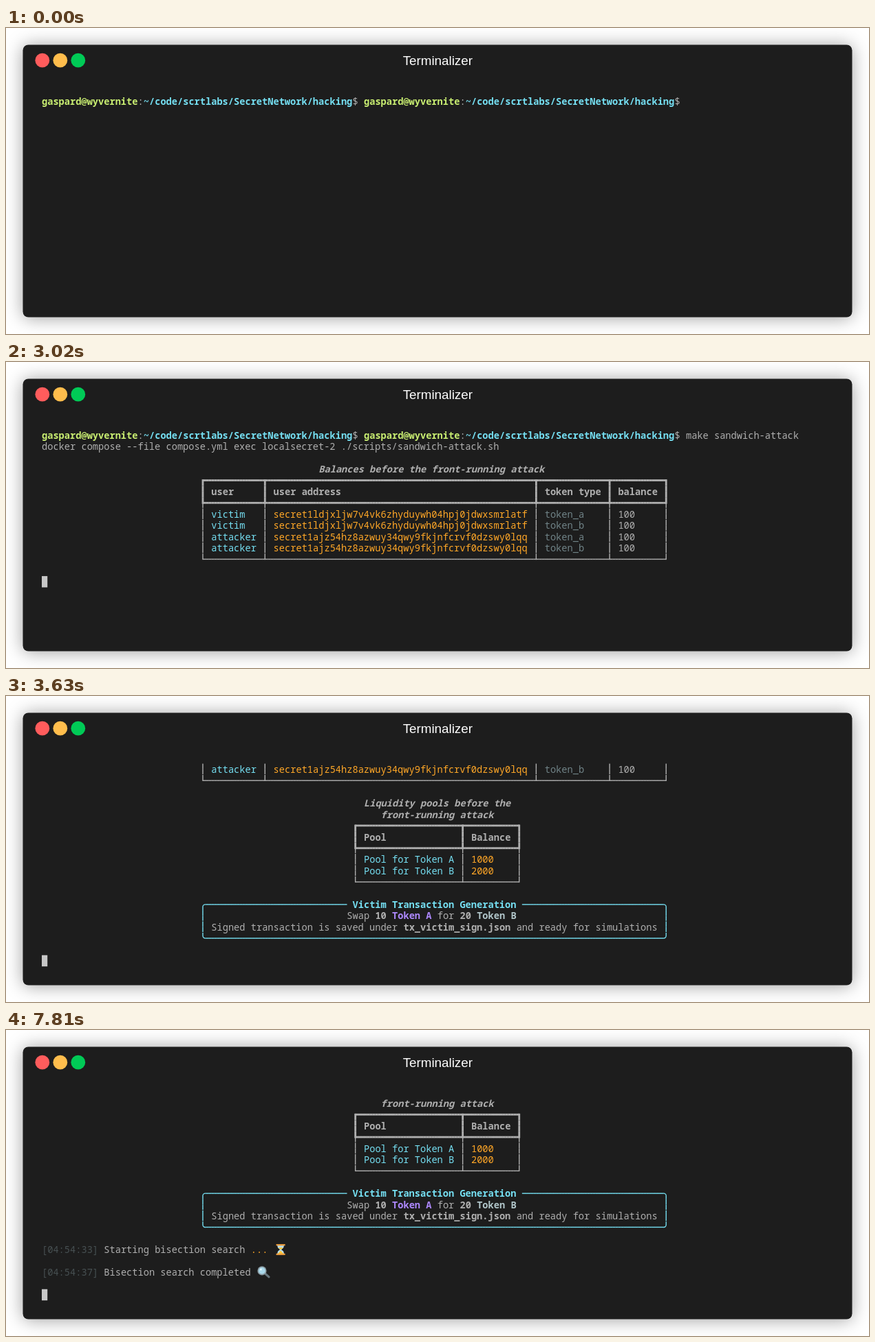
An HTML page with a canvas for the animation above (8 s loop, 1254x446 px).

```html
<!DOCTYPE html>
<html lang="en">
<head>
<meta charset="utf-8">
<title>Terminal session</title>
<style>
  html, body { margin: 0; width: 100%; height: 100%; overflow: hidden; background: #fff; }
  canvas { display: block; }
</style>
</head>
<body>
<canvas id="stage" width="1254" height="446"></canvas>
<script>
const ctx = document.getElementById('stage').getContext('2d');

const LOOP = 8000, CELL = 8.21, ROW = 16.42, LEFT = 52, TOP = 98.6, LAST_ROW = 17;
const FG = '#afafaf', GREEN = '#c8ed71', BLUE = '#75dff2', ORANGE = '#ffa727',
      TEAL = '#708387', PALE = '#b1c6ca', PURPLE = '#ae89fe', DIM = '#475052', CURSOR = '#c7c7c7';
const BOLD = 'bold', TITLE = 'italic bold';
const COMMAND = 'make sandwich-attack ', COMMAND_COL = 114;

// Arm weights of box characters: left, right, up, down
const ARMS = {
  '━': '2200', '─': '1100', '┃': '0022', '│': '0011', '┏': '0202', '┳': '2202', '┓': '2002',
  '┡': '0221', '╇': '2221', '┩': '2021', '└': '0110', '┴': '1110', '┘': '1010',
};
// Rounded corners: horizontal and vertical direction
const CORNERS = { '╭': [1, 1], '╮': [-1, 1], '╰': [1, -1], '╯': [-1, -1] };

// A line is a list of runs: [column, text, colour, style]
const prompt = col => [
  [col, 'gaspard@wyvernite', GREEN, BOLD],
  [col + 17, ':'],
  [col + 18, '~/code/scrtlabs/SecretNetwork/hacking', BLUE, BOLD],
  [col + 55, '$'],
];

function table(col, widths, header, rows, colours) {
  const rule = (l, fill, mid, r) => [[col, l + widths.map(w => fill.repeat(w)).join(mid) + r]];
  const body = (bar, cells, style) => {
    let x = col;
    const runs = [[x, bar]];
    widths.forEach((w, i) => {
      runs.push([x + 2, cells[i], style ? FG : colours[i], style], [x += w + 1, bar]);
    });
    return runs;
  };
  return [
    rule('┏', '━', '┳', '┓'),
    body('┃', header, BOLD),
    rule('┡', '━', '╇', '┩'),
    ...rows.map(cells => body('│', cells)),
    rule('└', '─', '┴', '┘'),
  ];
}

const VICTIM = 'secret1ldjxljw7v4vk6zhyduywh04hpj0jdwxsmrlatf';
const ATTACKER = 'secret1ajz54hz8azwuy34qwy9fkjnfcrvf0dzswy0lqq';

const lines = [
  [...prompt(0), ...prompt(57)],
  [[0, 'docker compose --file compose.yml exec localsecret-2 ./scripts/sandwich-attack.sh']],
  [],
  [[49, 'Balances before the front-running attack', FG, TITLE]],
  ...table(28, [10, 47, 12, 9], ['user', 'user address', 'token type', 'balance'], [
    ['victim', VICTIM, 'token_a', '100'],
    ['victim', VICTIM, 'token_b', '100'],
    ['attacker', ATTACKER, 'token_a', '100'],
    ['attacker', ATTACKER, 'token_b', '100'],
  ], [BLUE, ORANGE, TEAL, FG]),
  [],
  [[57, 'Liquidity pools before the', FG, TITLE]],
  [[60, 'front-running attack', FG, TITLE]],
  ...table(55, [18, 9], ['Pool', 'Balance'], [
    ['Pool for Token A', '1000'],
    ['Pool for Token B', '2000'],
  ], [BLUE, ORANGE]),
  [],
  [[28, '╭' + '─'.repeat(25), BLUE], [55, 'Victim Transaction Generation', BLUE, BOLD],
   [85, '─'.repeat(25) + '╮', BLUE]],
  [[28, '│', BLUE], [54, 'Swap'], [59, '10', FG, BOLD], [62, 'Token A', PURPLE, BOLD], [70, 'for'],
   [74, '20', FG, BOLD], [77, 'Token B', PALE, BOLD], [110, '│', BLUE]],
  [[28, '│', BLUE], [30, 'Signed transaction is saved under'], [64, 'tx_victim_sign.json', FG, BOLD],
   [84, 'and ready for simulations'], [110, '│', BLUE]],
  [[28, '╰' + '─'.repeat(81) + '╯', BLUE]],
  [],
  [[0, '[04:54:33]', DIM], [11, 'Starting bisection search'], [37, '...', ORANGE], [41, hourglass]],
  [],
  [[0, '[04:54:37]', DIM], [11, 'Bisection search completed'], [38, magnifier]],
  [],
];

// [time, cursor line, typed characters]; every line above the cursor is printed
const steps = [
  [0, 0, 0], [500, 0, 1], [610, 0, 2], [750, 0, 3], [860, 0, 4], [960, 0, 5], [1070, 0, 6],
  [1240, 0, 7], [1320, 0, 8], [1480, 0, 21], [2040, 1, 21], [2140, 2, 21], [2590, 3, 21],
  [3000, 12, 21], [3020, 13, 21], [3290, 21, 21], [3460, 22, 21], [3610, 26, 21],
  [3630, 27, 21], [3790, 28, 21], [3810, 29, 21], [5810, 30, 21], [7810, 31, 21],
];

function polygon(colour, ...points) {
  ctx.fillStyle = colour;
  ctx.beginPath();
  points.forEach(([x, y]) => ctx.lineTo(x, y));
  ctx.fill();
}

function circle(x, y, r, colour) {
  ctx.fillStyle = colour;
  ctx.beginPath();
  ctx.arc(x, y, r, 0, 7);
  ctx.fill();
}

function hourglass(x, y) {
  ctx.save();
  ctx.translate(x + 10.5, y + 8);
  polygon('#b5dcec', [-5, -6], [5, -6], [4, -2.5], [1, 0], [4, 2.5], [5, 6], [-5, 6], [-4, 2.5], [-1, 0], [-4, -2.5]);
  polygon('#ffc93c', [-3.5, -3], [3.5, -3], [0, 0.5]);
  polygon('#ffc93c', [0, 1.5], [4, 6], [-4, 6]);
  ctx.fillStyle = '#e89a3c';
  ctx.fillRect(-6.5, -8, 13, 2.3);
  ctx.fillRect(-6.5, 5.7, 13, 2.3);
  ctx.restore();
}

function magnifier(x, y) {
  ctx.save();
  ctx.translate(x + 8, y + 6);
  ctx.lineCap = 'round';
  ctx.strokeStyle = '#66757c';
  ctx.lineWidth = 3.2;
  ctx.beginPath();
  ctx.moveTo(5, 4.5);
  ctx.lineTo(10, 9);
  ctx.stroke();
  circle(0, 0, 6.6, '#8a9ba3');
  circle(0, 0, 4.9, '#a9d8ea');
  circle(-1.6, -1.8, 1.5, '#e2f5fc');
  ctx.restore();
}

function boxChar(char, x, y, colour) {
  const cx = x + CELL / 2, cy = y + ROW / 2;
  ctx.fillStyle = ctx.strokeStyle = colour;
  if (CORNERS[char]) {
    const [dx, dy] = CORNERS[char];
    ctx.lineWidth = 1.4;
    ctx.beginPath();
    ctx.moveTo(cx + dx * CELL / 2, cy);
    ctx.arcTo(cx, cy, cx, cy + dy * ROW / 2, 3.5);
    ctx.lineTo(cx, cy + dy * ROW / 2);
    ctx.stroke();
    return;
  }
  const [l, r, u, d] = [...ARMS[char]].map(w => [0, 1.4, 2.8][w]);
  const gap = d === 1.4 ? 0.8 : 0;
  ctx.fillRect(x, cy - l / 2, CELL / 2 + 0.2, l);
  ctx.fillRect(cx, cy - r / 2, CELL / 2 + 0.2, r);
  const join = Math.max(l, r) / 2;
  ctx.fillRect(cx - u / 2, y, u, ROW / 2 + join);
  ctx.fillRect(cx - d / 2, cy - join, d, ROW / 2 + join - gap);
}

function drawRun([col, text, colour = FG, style = ''], row) {
  const x = LEFT + col * CELL, y = TOP + row * ROW;
  if (typeof text === 'function') return text(x, y);
  if (ARMS[text[0]] || CORNERS[text[0]]) {
    [...text].forEach((char, i) => boxChar(char, x + i * CELL, y, colour));
    return;
  }
  ctx.font = `${style} 13.68px "Noto Sans Mono", "DejaVu Sans Mono", monospace`;
  ctx.fillStyle = colour;
  ctx.fillText(text, x, y + 13.4);
}

function drawWindow() {
  ctx.fillStyle = '#fff';
  ctx.fillRect(0, 0, 1254, 446);
  ctx.save();
  ctx.shadowColor = 'rgba(0,0,0,.38)';
  ctx.shadowBlur = 26;
  ctx.shadowOffsetY = 1;
  ctx.fillStyle = '#1d1d1d';
  ctx.beginPath();
  ctx.roundRect(24.5, 24.5, 1205, 397, 8);
  ctx.fill();
  ctx.restore();
  ['#ff5c5c', '#ffbd4c', '#00ca56'].forEach((colour, i) => circle(52.8 + 26 * i, 47.2, 10.4, colour));
  ctx.font = '18.8px "Liberation Sans", Arial, sans-serif';
  ctx.fillStyle = '#fff';
  ctx.textAlign = 'center';
  ctx.fillText('Terminalizer', 627.3, 54);
  ctx.textAlign = 'left';
}

function draw(time) {
  const [, cursor, typed] = steps.findLast(([start]) => start <= time);
  const scroll = Math.max(0, cursor - LAST_ROW);
  drawWindow();
  for (let n = scroll; n < Math.max(1, cursor); n++) {
    lines[n].forEach(run => drawRun(run, n - scroll));
  }
  if (!typed) return;
  if (!scroll) drawRun([COMMAND_COL, COMMAND.slice(0, typed)], 0);
  const col = cursor ? 0 : COMMAND_COL + typed;
  ctx.fillStyle = CURSOR;
  ctx.fillRect(LEFT + col * CELL, TOP + (cursor - scroll) * ROW, CELL, ROW);
}

const start = performance.now();
function tick() {
  draw((performance.now() - start) % LOOP);
  requestAnimationFrame(tick);
}
tick();
</script>
</body>
</html>
```
